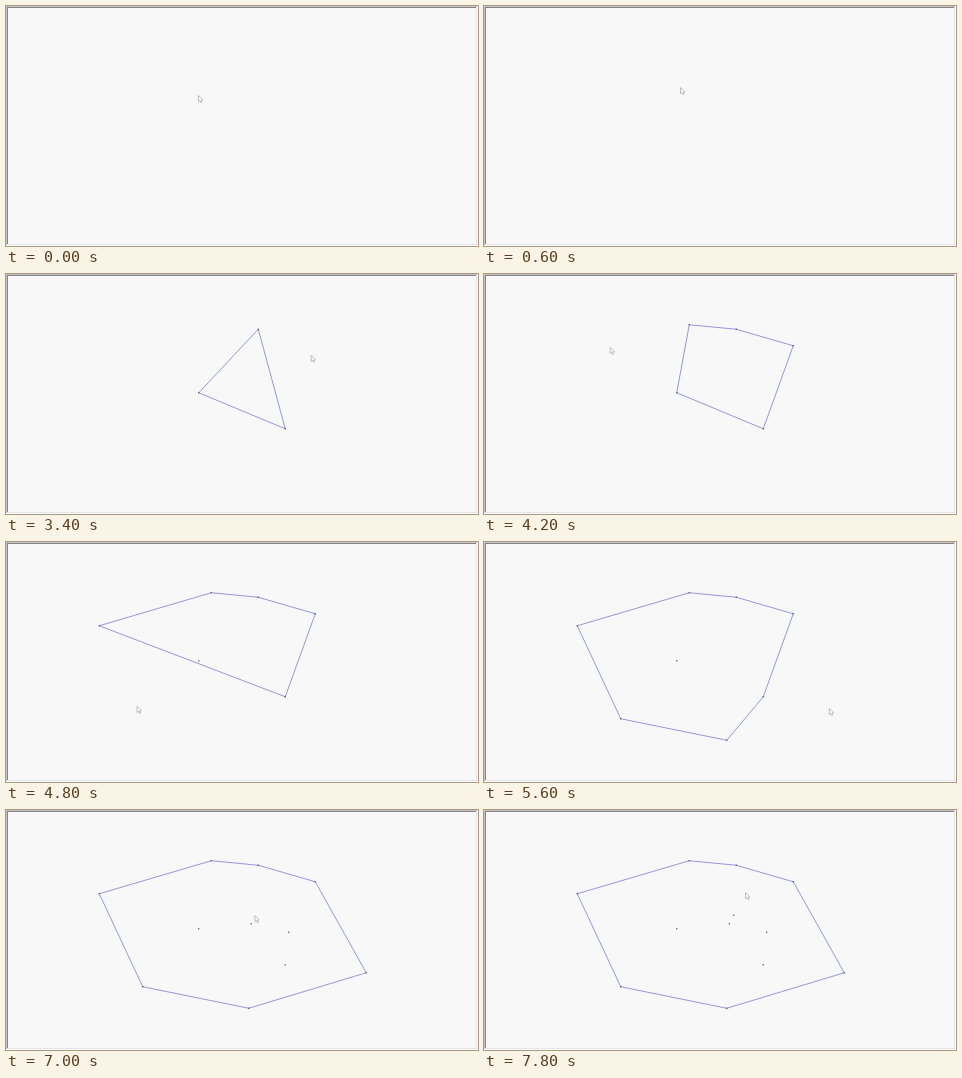
Write an HTML page with a canvas that moves like this. It is 472 px wide and 240 px high and loops after 8000 ms.

```html
<!DOCTYPE html>
<html lang="en">
<head>
<meta charset="utf-8">
<title>Convex hull</title>
<style>
html, body { margin: 0; width: 100%; height: 100%; overflow: hidden; background: #f8f8f8; }
canvas { display: block; width: 472px; height: 240px; }
</style>
</head>
<body>
<canvas id="stage" width="472" height="240"></canvas>
<script>
const ctx = document.getElementById('stage').getContext('2d');
const W = 472, H = 240, LOOP = 8000, STEP = 200;

// Clicked points: time, x, y
const clicks = [
  [2200, 252, 55], [2800, 192.5, 118.5], [3200, 279, 154.5], [3600, 309, 71.5],
  [4000, 205, 50.5], [4600, 93, 83.5], [5000, 136.5, 176.5], [5400, 242.5, 198],
  [5800, 360, 162.5], [6200, 282.5, 122], [6800, 245, 113.5], [7200, 249.5, 105]
];

// The pointer drifts, jumps to the first point, visits each click and leaves.
const stops = [
  [0, 192.5, 90], [600, 196.5, 82], [1200, 196.5, 82], [1400, 252, 55],
  ...clicks, [7800, 261.5, 83]
];

const easeOut = u => 1 - (1 - u) ** 3;
const mix = (a, b, u) => a + (b - a) * u;

function pointerAt(t) {
  const next = stops.findIndex(s => s[0] >= t);
  if (next < 1) return stops.at(next);
  const a = stops[next - 1], b = stops[next];
  const u = easeOut((t - a[0]) / (b[0] - a[0]));
  return a.map((v, i) => mix(v, b[i], u));
}

const cross = (o, a, b) => (a[0] - o[0]) * (b[1] - o[1]) - (a[1] - o[1]) * (b[0] - o[0]);

function halfHull(points) {
  const chain = [];
  for (const p of points) {
    while (chain.length > 1 && cross(chain.at(-2), chain.at(-1), p) <= 0) chain.pop();
    chain.push(p);
  }
  return chain.slice(0, -1);
}

function hull(points) {
  const sorted = [...points].sort((a, b) => a[0] - b[0] || a[1] - b[1]);
  return [...halfHull(sorted), ...halfHull(sorted.reverse())];
}

function rect(color, x, y, w, h) {
  ctx.fillStyle = color;
  ctx.fillRect(x, y, w, h);
}

function trace(points) {
  ctx.beginPath();
  for (const [x, y] of points) ctx.lineTo(x, y);
  ctx.closePath();
}

function stroke(color, width) {
  ctx.strokeStyle = color;
  ctx.lineWidth = width;
  ctx.stroke();
}

// Sunken border: dark on the top and left, light on the bottom and right
function drawPanel() {
  rect('#ffffff', 0, 0, W, H);
  rect('#c4c4c4', 0, 0, W - 1, H - 1);
  rect('#e5e5e5', 1, 1, W - 2, H - 2);
  rect('#848484', 1, 1, W - 3, H - 3);
  rect('#f8f8f8', 2, 2, W - 4, H - 4);
}

function drawPointer(x, y) {
  const shape = [[0, 0], [0, 6], [1.4, 5], [2.4, 7], [3.4, 6.6], [2.5, 4.6], [4.3, 4.4]];
  trace(shape.map(([dx, dy]) => [x + dx, y - 0.5 + dy]));
  ctx.fillStyle = '#fff';
  ctx.fill();
  stroke('#9c9c9c', 0.65);
}

function draw(time) {
  const t = Math.floor(time % LOOP / STEP) * STEP;
  const points = clicks.filter(c => c[0] <= t).map(c => [c[1], c[2]]);
  drawPanel();
  if (points.length > 1) {
    trace(hull(points).map(([x, y]) => [x + 0.25, y + 0.25]));
    stroke('#6262cb', 0.65);
  }
  for (const [x, y] of points) rect('#3c3c58', x - 0.35, y - 0.35, 1.2, 1.2);
  const [, px, py] = pointerAt(t);
  drawPointer(px, py);
}

const start = performance.now();
function tick() {
  draw(performance.now() - start);
  requestAnimationFrame(tick);
}
tick();
</script>
</body>
</html>
```
